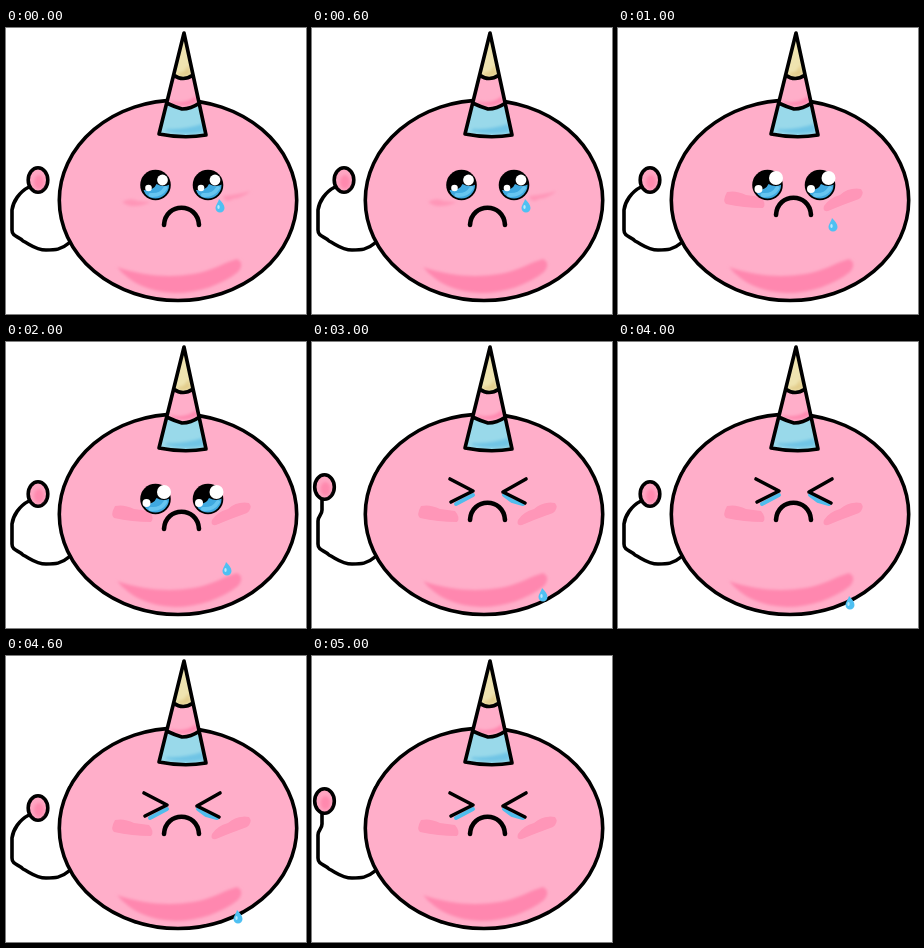
An HTML page for the animation above (6 s loop, 300x286 px).

```html
<!DOCTYPE html>
<html lang="en">
<head>
<meta charset="utf-8">
<title>Crying unicorn ball</title>
<style>
html, body { margin: 0; width: 100%; height: 100%; overflow: hidden; background: #fff; }
svg { display: block; width: 300px; height: 286px; }
.ink { stroke: #000; stroke-width: 3.6; stroke-linecap: round; stroke-linejoin: round; }
.line { fill: none; }
.blush { fill: #ff96b8; }
.water { stroke: #4fbdec; stroke-width: 4; stroke-linecap: round; fill: none; }
</style>
</head>
<body>
<svg viewBox="0 0 300 286">
  <defs>
    <filter id="soft" x="-20%" y="-60%" width="140%" height="220%"><feGaussianBlur stdDeviation="1.5"/></filter>
    <clipPath id="iris"><circle r="13.5"/></clipPath>
    <g id="openEye">
      <circle r="15.3"/>
      <path d="M-12 5Q-2 6 1-1Q8 3 15-1V15H-8Z" fill="#3fa9e0" clip-path="url(#iris)"/>
      <path d="M-5 10Q5 11 10 3" fill="none" stroke="#66c5f0" stroke-width="4" stroke-linecap="round"/>
    </g>
  </defs>

  <g id="tailLow">
    <path class="ink line" stroke-width="3" d="M63 215C55 222 49 222 40 222C30 222 25 217 17 213C13 208 6 209 6 202V182C7 174 13 164 23 159"/>
    <ellipse class="ink" cx="32" cy="152" rx="9.8" ry="12.2" fill="#ffa5c2"/>
    <ellipse cx="33" cy="154" rx="5" ry="7" fill="#ff89ae" filter="url(#soft)"/>
  </g>
  <g id="tailHigh">
    <path class="ink line" d="M63 215C55 222 49 222 40 222C30 222 25 217 17 213C13 208 6 209 6 202V179C6 174 10 173 10 168V157"/>
    <ellipse class="ink" cx="12.5" cy="145" rx="9.8" ry="12.2" fill="#ffa5c2"/>
    <ellipse cx="13.5" cy="147" rx="5" ry="7" fill="#ff89ae" filter="url(#soft)"/>
  </g>

  <ellipse class="ink" cx="172" cy="172.3" rx="118.7" ry="100.2" fill="#ffaec9"/>
  <path d="M111 239C137 248 163 250 187 246C206 243 217 235 231 231Q239 235 232 244C215 257 193 265 169 265C144 264 125 256 111 239Z" fill="#ff87af" filter="url(#soft)"/>

  <path d="M178 5L153 106Q178 111 200 107Z" fill="#99d9ea"/>
  <path d="M160 101Q179 102 196 96L198 104Q178 108 160 103Z" fill="#6fc4e5" filter="url(#soft)"/>
  <path d="M178 5L160.5 75Q176 86 193.5 75Z" fill="#ffaec9"/>
  <path d="M165 73Q179 77 190 68L191 74Q177 81 165 75Z" fill="#ff87af" filter="url(#soft)"/>
  <path d="M178 5L167.5 47Q177 55 187 47Z" fill="#efe4b0"/>
  <path d="M171 45Q179 46 182 37L185 46Q178 50 171 47Z" fill="#e3cd8c" filter="url(#soft)"/>
  <path class="ink line" d="M178 5L153 106Q178 111 200 107ZM160.5 75Q169 79 176 81Q185 81 193.5 75M167.5 47Q177 54 187 47"/>

  <g id="smallBlush" class="blush" filter="url(#soft)">
    <path d="M116 174Q124 169 132 173L145 174Q136 178 130 178Q122 179 116 174Z"/>
    <path d="M217 168Q229 167 245 163Q236 170 227 171Q219 176 217 168Z"/>
  </g>
  <g id="bigBlush" class="blush">
    <path d="M109 164Q118 162 128 167L143 169Q149 176 145 180Q126 180 108 176Q104 173 109 164Z"/>
    <path d="M206 178Q211 170 222 167Q231 159 243 161Q247 166 241 171Q224 177 210 183Q204 184 206 178Z"/>
  </g>

  <g id="open">
    <use href="#openEye" x="149.5" y="157"/>
    <use href="#openEye" x="202" y="157"/>
    <g id="glints" fill="#fff"></g>
  </g>
  <g id="shut">
    <path class="water" d="M144 162L161 153M192 153L200 159L211 162"/>
    <path class="ink line" d="M138 137L161 149L139 160M214 137L191 150L213 161"/>
  </g>

  <path id="mouth" class="ink line" style="stroke-width:4.6" d="M-17.5 9C-16-14 16-14 17.5 9"/>
  <g id="tear">
    <path d="M-1-7C2-4 4.5-1 4.5 2A4.5 4.5 0 0 1-4.5 2C-4.5-1-2-3-1-7Z" fill="#4fc0f2"/>
    <ellipse cx="-1.5" cy="1" rx="1.2" ry="2" fill="#b9e9fc"/>
  </g>
</svg>
<script>
const $ = id => document.getElementById(id);
const STEP = 1000;
const poses = [
  { tear: [214, 178], mouth: 188, calm: true },
  { tear: [215, 197], mouth: 178 },
  { tear: [221, 227], mouth: 178 },
  { tear: [231, 253], mouth: 169, shut: true, tailUp: true },
  { tear: [232, 261], mouth: 169, shut: true },
  { mouth: 169, shut: true, tailUp: true }
];
const show = (id, visible) => $(id).style.display = visible ? "" : "none";

function drawGlints(calm) {
  const [dx, dy, big, small] = calm ? [7, -5, 5.4, 3.3] : [8.5, -7, 7, 4];
  const sx = calm ? -7 : -9, sy = calm ? 3 : 4;
  $("glints").innerHTML = [149.5, 202].map(x =>
    `<circle cx="${x + dx}" cy="${157 + dy}" r="${big}"/>
     <circle cx="${x + sx}" cy="${157 + sy}" r="${small}"/>`).join("");
}

function render(pose) {
  show("tailHigh", pose.tailUp);
  show("tailLow", !pose.tailUp);
  show("smallBlush", pose.calm);
  show("bigBlush", !pose.calm);
  show("open", !pose.shut);
  show("shut", pose.shut);
  show("tear", pose.tear);
  if (pose.tear) $("tear").setAttribute("transform", `translate(${pose.tear})`);
  $("mouth").setAttribute("transform", `translate(175.5 ${pose.mouth})`);
  drawGlints(pose.calm);
}

const start = performance.now();
let current = -1;
function tick(now) {
  const index = Math.floor(Math.max(0, now - start) / STEP) % poses.length;
  if (index !== current) render(poses[current = index]);
  requestAnimationFrame(tick);
}
tick(start);
</script>
</body>
</html>
```
